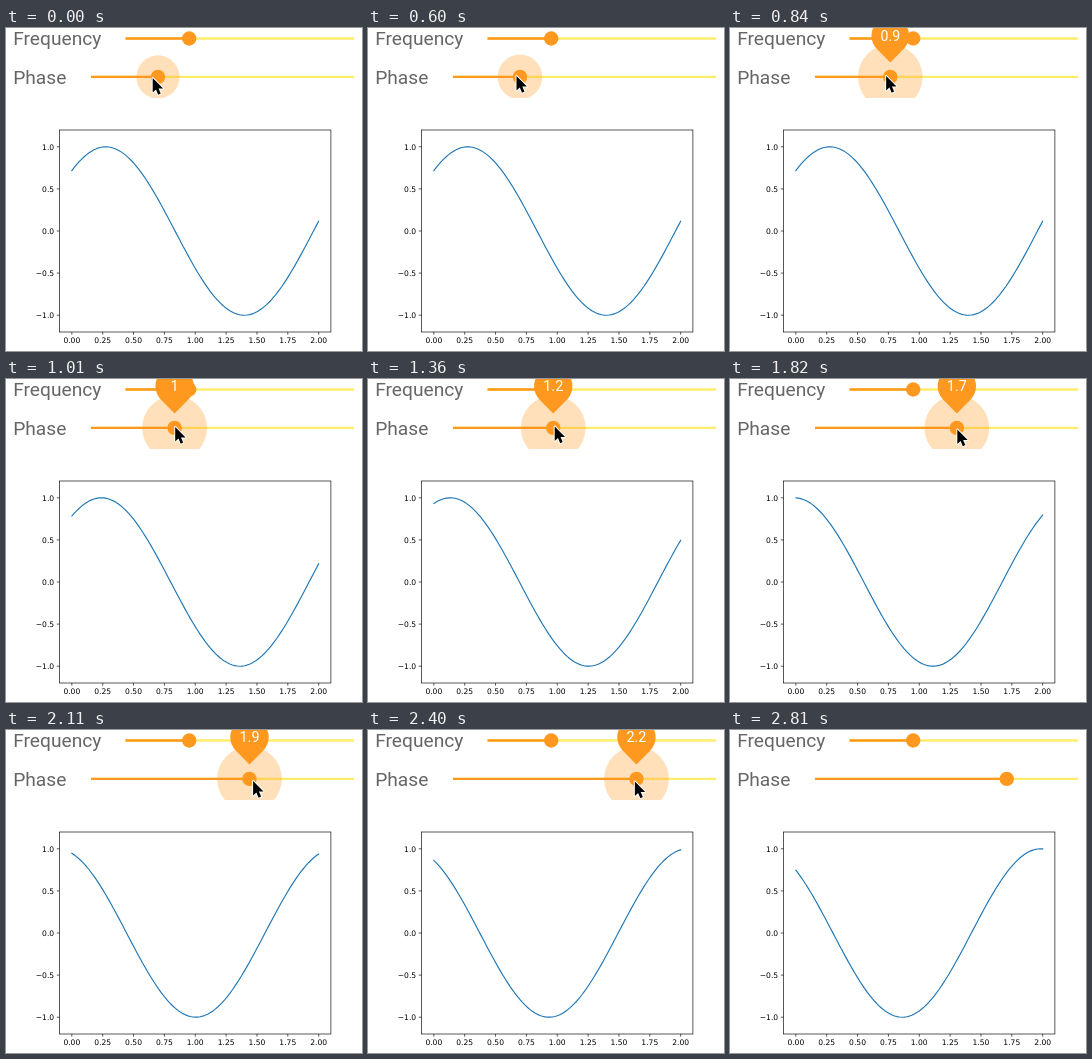
An HTML page for the animation above (3410 ms loop, 356 by 323 pixels).

```html
<!DOCTYPE html>
<html lang="en">
<head>
<meta charset="utf-8">
<title>Phase slider</title>
<style>
  html, body { margin: 0; width: 100%; height: 100%; overflow: hidden; background: #fff; }
  svg { display: block; width: 356px; height: 323px; }
  .name { font: 19.2px Roboto, sans-serif; fill: #666; }
  .tick { font: 7.6px "DejaVu Sans", sans-serif; fill: #000; }
  .value { font: 14.4px Roboto, sans-serif; fill: #fff; text-anchor: middle; }
  .rail { stroke: #ffec6c; stroke-width: 2.4; }
  .fill { stroke: #ff981e; stroke-width: 2.4; }
  .orange { fill: #ff981e; }
  .axis { fill: none; stroke: #000; stroke-width: .65; }
  .curve { fill: none; stroke: #1f77b4; stroke-width: 1.15; stroke-linecap: square; stroke-linejoin: round; }
  .cursor { fill: #000; stroke: #fff; stroke-width: 2; stroke-linejoin: round; paint-order: stroke; }
</style>
</head>
<body>
<svg viewBox="0 0 356 323">
  <clipPath id="controls"><rect width="356" height="70"/></clipPath>
  <g id="plot">
    <rect class="axis" x="53.5" y="102" width="271.4" height="202"/>
    <path id="curve" class="curve"/>
  </g>
  <g clip-path="url(#controls)">
    <text class="name" x="7.2" y="17.4">Frequency</text>
    <path class="rail" d="M119.5 10.5H348"/>
    <path class="fill" d="M119.5 10.5H183"/>
    <circle class="orange" cx="183.2" cy="10.5" r="7.2"/>
    <text class="name" x="7.2" y="55.8">Phase</text>
    <path class="rail" d="M85 48.9H348"/>
    <path id="fill" class="fill"/>
    <circle id="halo" class="orange" cy="48.9" opacity=".3"/>
    <circle id="thumb" class="orange" cy="48.9" r="7.2"/>
    <g id="label">
      <path class="orange" d="M0 0L-13.58-13.58A19.2 19.2 0 1 1 13.58-13.58Z"/>
      <text id="value" class="value" y="-22.1"></text>
    </g>
  </g>
  <path id="cursor" class="cursor" d="M0 0V14.6L3.3 11.5L5.5 16.7L8 15.6L5.8 10.6H10.4Z"/>
</svg>
<script>
const LOOP = 3410, DRAG = 600, STEP = 58;
const RAIL = 85.4, PER_UNIT = 83.2;
const OMEGA = 2.8, LAG = 100;
const PRESS = 593, RELEASE = 2545, LEAVE = 2640, EASE = 300;

// Pointer path: time, x, y
const pointer = [
  [0, 146.7, 50], [180, 147.6, 49], [240, 148.5, 48], [600, 148.5, 48],
  [750, 150, 48], [1010, 169.5, 48], [1360, 187, 47.5], [1820, 227.5, 50.5],
  [2400, 267, 51.5], [2490, 274, 51.5], [2590, 275, 55], [2690, 279, 160], [2800, 284, 330]
];

const $ = id => document.getElementById(id);
const px = x => 65.84 + x * 123.41;
const py = y => 203 - y * 84.2;
const clamp = p => Math.min(1, Math.max(0, p));
const easeOut = p => 1 - (1 - clamp(p)) ** 3;
const mix = (a, b, p) => a + (b - a) * p;

function add(tag, attrs, text = '') {
  const el = document.createElementNS('http://www.w3.org/2000/svg', tag);
  for (const key in attrs) el.setAttribute(key, attrs[key]);
  el.textContent = text;
  $('plot').append(el);
}

for (let i = 0; i <= 8; i++) {
  const x = px(i / 4);
  add('path', { class: 'axis', d: `M${x} 304v2.7` });
  add('text', { class: 'tick', x, y: 315.3, 'text-anchor': 'middle' }, (i / 4).toFixed(2));
}
for (let i = -2; i <= 2; i++) {
  const y = py(i / 2);
  add('path', { class: 'axis', d: `M53.5 ${y}h-2.7` });
  add('text', { class: 'tick', x: 48.2, y: y + 2.8, 'text-anchor': 'end' },
    (i / 2).toFixed(1).replace('-', '\u2212'));
}

function pointerAt(t) {
  const i = pointer.findIndex(p => p[0] > t);
  if (i < 0) return pointer[pointer.length - 1].slice(1);
  const [a, b] = [pointer[i - 1], pointer[i]];
  const p = (t - a[0]) / (b[0] - a[0]);
  return [mix(a[1], b[1], p), mix(a[2], b[2], p)];
}

function phaseAt(t) {
  const x = pointerAt(Math.min(t, RELEASE))[0];
  return Math.max(8, Math.round((x - RAIL) / PER_UNIT * 10)) / 10;
}

function haloAt(t) {
  if (t < RELEASE) return mix(21.6, 32.4, easeOut((t - PRESS) / EASE));
  if (t < LEAVE) return mix(32.4, 21.6, easeOut((t - RELEASE) / EASE));
  return mix(24, 2.2, easeOut((t - LEAVE) / 160));
}

function curvePath(phase) {
  let d = '';
  for (let i = 0; i <= 100; i++) {
    const x = i / 50;
    d += `${i ? 'L' : 'M'}${px(x).toFixed(2)} ${py(Math.sin(OMEGA * x + phase)).toFixed(2)}`;
  }
  return d;
}

// The picture advances in discrete steps.
function snap(t) {
  if (t < 180) return 0;
  if (t < 240) return 180;
  if (t < DRAG) return 240;
  return DRAG + Math.min(38, Math.floor((t - DRAG) / STEP)) * STEP;
}

function draw(time) {
  const t = snap(time);
  const phase = phaseAt(t);
  const x = RAIL + phase * PER_UNIT;
  const [cx, cy] = pointerAt(t);
  const grow = t < RELEASE
    ? easeOut((t - DRAG - 10) / EASE)
    : 1 - easeOut((t - RELEASE) / 240);

  $('fill').setAttribute('d', `M85 48.9H${x}`);
  $('thumb').setAttribute('cx', x);
  $('halo').setAttribute('cx', x);
  $('halo').setAttribute('r', haloAt(t));
  $('label').setAttribute('transform', `translate(${x} 34.4) scale(${grow})`);
  $('label').setAttribute('opacity', grow);
  $('value').textContent = String(phase);
  $('curve').setAttribute('d', curvePath(phaseAt(Math.max(0, t - LAG))));
  $('cursor').setAttribute('transform', `translate(${cx} ${cy})`);
}

const start = performance.now();
function tick() {
  draw((performance.now() - start) % LOOP);
  requestAnimationFrame(tick);
}
tick();
</script>
</body>
</html>
```
